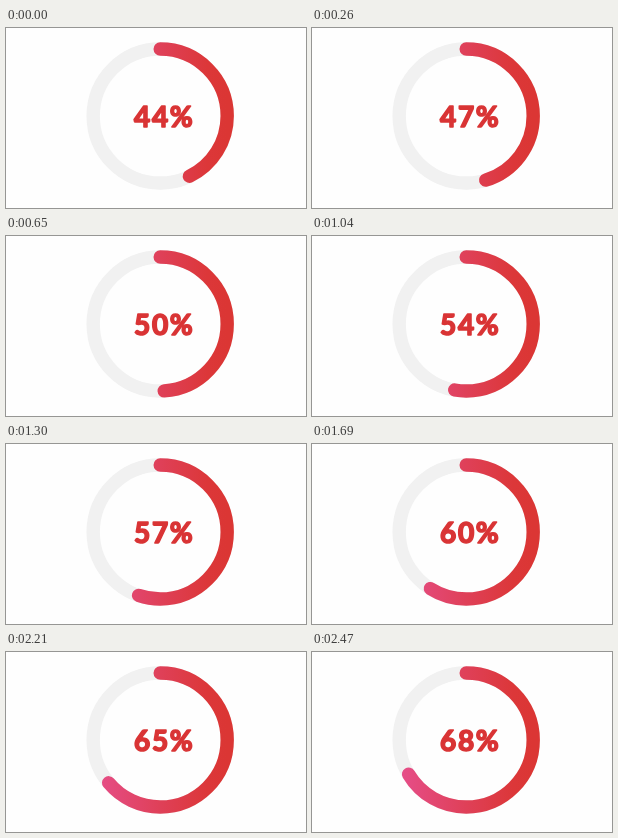
Write an HTML page that moves like this. It is 300 px wide and 180 px high and loops after 2600 ms.

```html
<!DOCTYPE html>
<html lang="en">
<head>
<meta charset="utf-8">
<title>Progress ring</title>
<style>
  html, body { margin: 0; width: 100%; height: 100%; overflow: hidden; background: #fefefe; }
  svg { display: block; width: 300px; height: 180px; }
  circle { fill: none; stroke-width: 13.4; }
  text {
    font: 700 28px Lato, "Open Sans", sans-serif;
    letter-spacing: 1.6px;
    text-anchor: middle;
    fill: #d93435;
    stroke: #d93435;
    stroke-width: 1.6;
    stroke-linejoin: round;
  }
</style>
</head>
<body>
<svg viewBox="0 0 300 180">
  <defs>
    <!-- The ring is turned by -90 degrees, so its local y axis runs left to right. -->
    <linearGradient id="tint" gradientUnits="userSpaceOnUse" x1="0" y1="-67" x2="0" y2="67">
      <stop offset="0" stop-color="#e64e8a"/>
      <stop offset=".5" stop-color="#df4058"/>
      <stop offset=".85" stop-color="#dc3739"/>
      <stop offset="1" stop-color="#db3634"/>
    </linearGradient>
  </defs>
  <g transform="translate(154.2 88) rotate(-90)">
    <circle r="67" stroke="#f1f1f1"/>
    <circle id="arc" r="67" pathLength="100" stroke="url(#tint)" stroke-linecap="round"/>
  </g>
  <text id="label" x="158.2" y="98.6">44%</text>
</svg>
<script>
  const STEP = 130, STEPS = 20;
  const arc = document.getElementById('arc');
  const label = document.getElementById('label');
  const start = performance.now();

  function draw(now) {
    const step = Math.floor(Math.max(0, now - start) / STEP) % STEPS;
    const percent = 42.8 + 1.245 * step;
    arc.setAttribute('stroke-dasharray', `${percent} 100`);
    label.textContent = Math.floor(percent + 1.75) + '%';
    requestAnimationFrame(draw);
  }
  draw(start);
</script>
</body>
</html>
```
